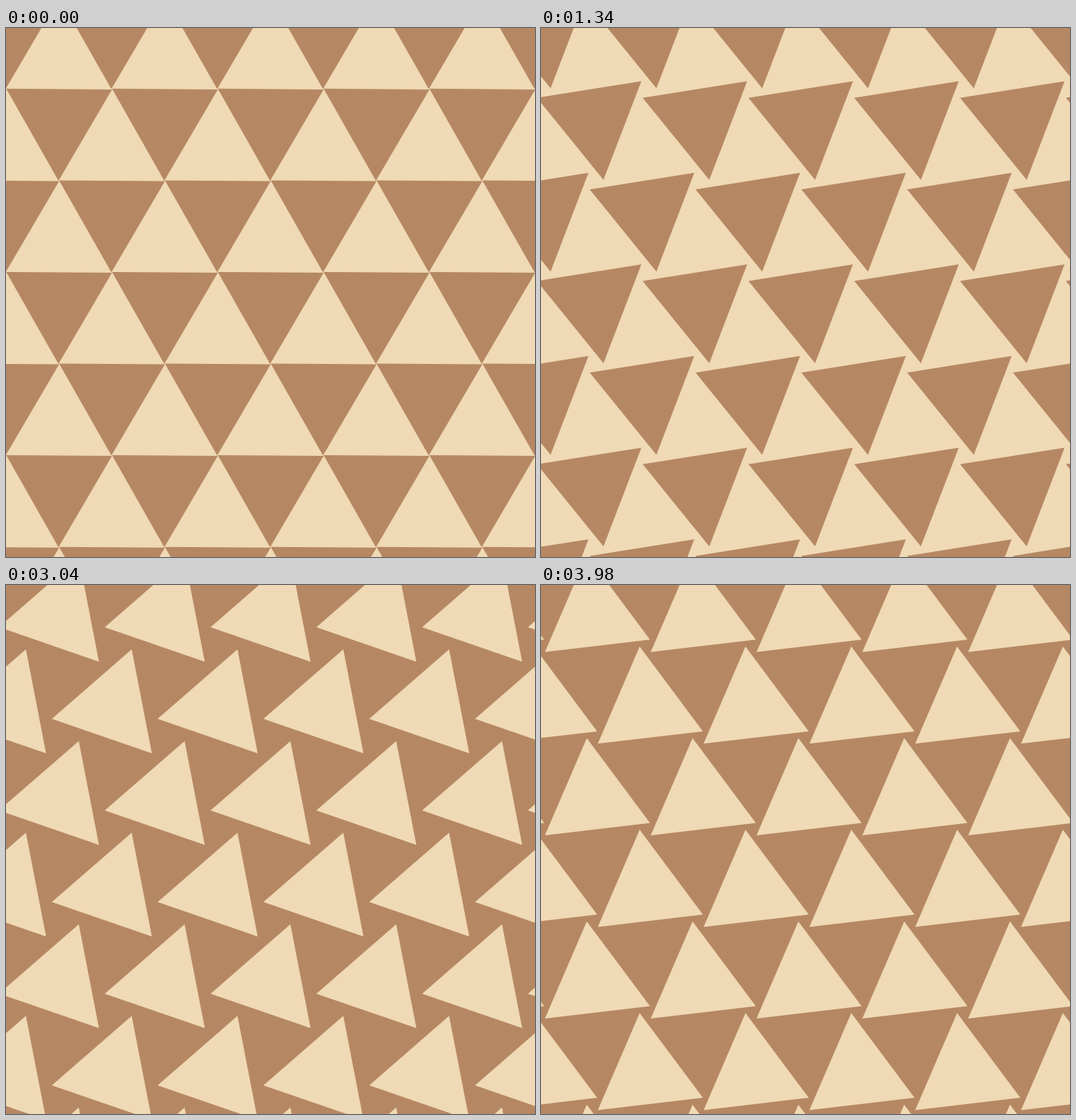
An HTML page with a canvas for the animation above (4 s loop, 748 px wide and 748 px high).

```html
<!DOCTYPE html>
<html lang="en">
<head>
<meta charset="utf-8">
<title>Turning triangles</title>
<style>
  html, body { margin: 0; width: 100%; height: 100%; overflow: hidden; background: #f0d9b5; }
  canvas { display: block; width: 748px; height: 748px; }
</style>
</head>
<body>
<canvas id="stage" width="748" height="748"></canvas>
<script>
const SIZE = 748;
const LOOP = 4000;
const HALF = LOOP / 2;
const LIGHT = '#f0d9b5';
const DARK = '#b58863';
const SIDE = SIZE / 5;
const ROW = SIDE * Math.sqrt(3) / 2;
const RADIUS = SIDE / Math.sqrt(3);
const THIRD = Math.PI * 2 / 3;

const ctx = document.getElementById('stage').getContext('2d');

// Falls from 1 to 0: a fast start, then a long, nearly linear tail.
function decay(u) {
  const k = 4.07 + 1.45 * u + 1.45 * Math.exp(-30 * u);
  return (1 - u) / (1 + k * u);
}

function triangle(x, y, angle) {
  for (let i = 0; i < 3; i++) {
    const a = angle + i * THIRD;
    ctx.lineTo(x + RADIUS * Math.cos(a), y + RADIUS * Math.sin(a));
  }
  ctx.closePath();
}

// Rows alternate by half a side; oddShift picks which rows are moved.
function lattice(top, oddShift, angle, back, front) {
  ctx.fillStyle = back;
  ctx.fillRect(0, 0, SIZE, SIZE);
  ctx.fillStyle = front;
  for (let row = -1; row <= 7; row++) {
    const odd = Math.abs(row % 2) === 1;
    const shift = odd === oddShift ? SIDE / 2 : 0;
    for (let col = -1; col <= 6; col++) {
      ctx.beginPath();
      triangle(col * SIDE + shift, top + row * ROW, angle);
      ctx.fill();
    }
  }
}

function draw(time) {
  const t = time % LOOP;
  if (t < HALF) {
    const turn = -THIRD * decay(t / HALF);
    lattice(0, true, Math.PI / 2 + turn, LIGHT, DARK);
  } else {
    const turn = THIRD * decay(1 - (t - HALF) / HALF);
    lattice(ROW / 3, false, -Math.PI / 2 + turn, DARK, LIGHT);
  }
}

const start = performance.now();

function tick(now) {
  draw(Math.max(0, now - start));
  requestAnimationFrame(tick);
}

draw(0);
requestAnimationFrame(tick);
</script>
</body>
</html>
```
